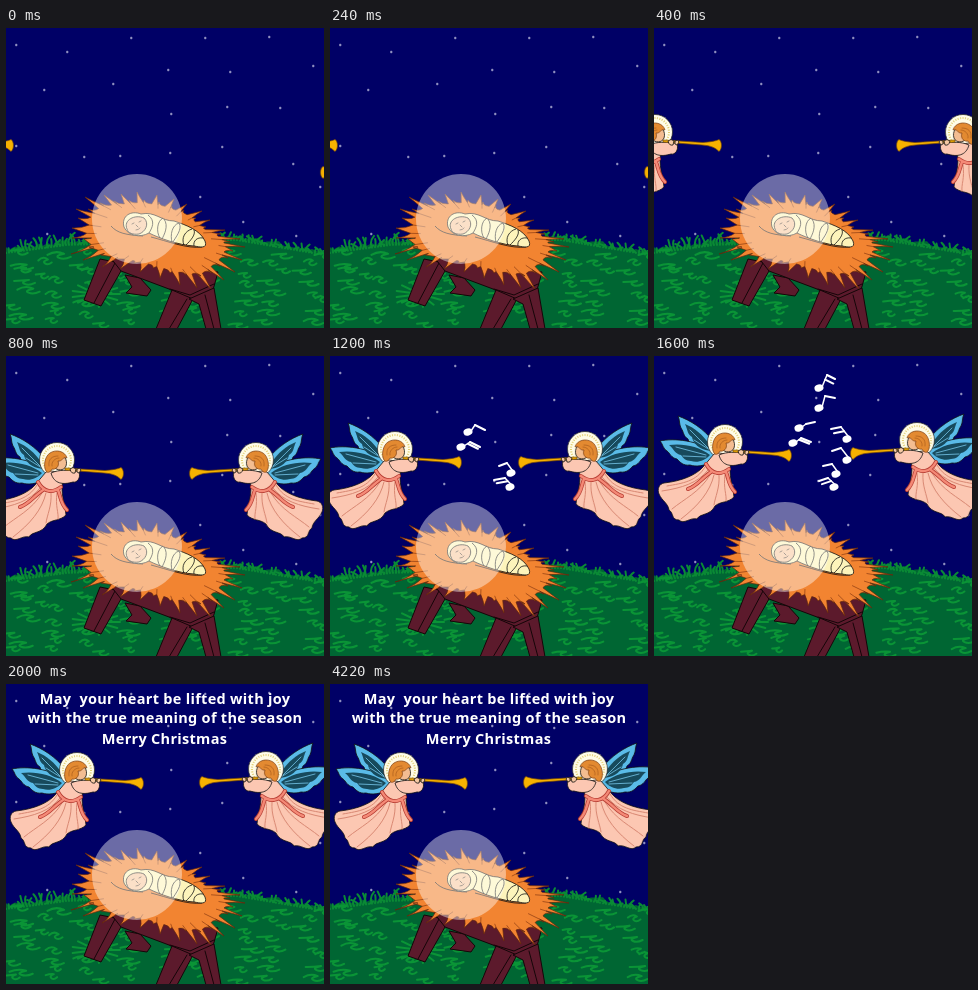
These frames come from a looping animation (318x300 px, 5700 ms). An HTML page:

```html
<!DOCTYPE html>
<html lang="en">
<head>
<meta charset="utf-8">
<title>Manger and angels</title>
<style>
html, body { margin: 0; width: 100%; height: 100%; overflow: hidden; background: #006; }
svg { display: block; width: 318px; height: 300px; }
.left, .right, .song, .wish { animation: 5.7s step-end infinite; }
.left { animation-name: left; }
.right { animation-name: right; }
.song { animation-name: song1; opacity: 0; }
.song.b { animation-name: song2; }
.wish { animation-name: wish; opacity: 0; }
@keyframes left {
  0% { transform: translate(-130px, 18px); }
  7.0175% { transform: translate(-70px, 18px); }
  14.0351% { transform: translate(-20px, 18px); }
  21.0526% { transform: translate(-6px, 7px); }
  28.0702%, 100% { transform: none; }
}
@keyframes right {
  0% { transform: translate(452px, 45px); }
  7.0175% { transform: translate(380px, 18px); }
  14.0351% { transform: translate(321px, 18px); }
  21.0526% { transform: translate(326px, 7px); }
  28.0702% { transform: translate(334px, -2px); }
  35.0877%, 100% { transform: translate(331px, -1px); }
}
@keyframes song1 { 0% { opacity: 0; } 21.0526% { opacity: 1; } 28.0702%, 100% { opacity: 0; } }
@keyframes song2 { 0% { opacity: 0; } 28.0702% { opacity: 1; } 35.0877%, 100% { opacity: 0; } }
@keyframes wish { 0% { opacity: 0; } 35.0877%, 100% { opacity: 1; } }
text { font: bold 14.5px "Noto Sans", "Open Sans", sans-serif; letter-spacing: .3px; fill: #fff; text-anchor: middle; white-space: pre; }
.ink { stroke: #111; stroke-width: .8; stroke-linejoin: round; }
.wood { fill: #5c1a2c; stroke: #150508; stroke-width: 1; stroke-linejoin: round; }
.line { fill: none; stroke-linecap: round; stroke-linejoin: round; }
</style>
</head>
<body>
<svg viewBox="0 0 318 300">
  <defs>
    <g id="angel">
      <g class="ink" fill="#5abbe8">
        <path d="M24 60C36 64 50 73 59 85L62 99L50 96C42 95 35 88 34 83C29 80 30 76 27 72C25 68 26 64 24 60Z"/>
        <path d="M6 85C20 82 44 84 62 97L57 106C50 110 42 111 36 109C29 110 26 106 23 103C17 102 16 97 13 95C9 93 9 88 6 85Z"/>
      </g>
      <path fill="#174a5c" d="M31 68C41 72 49 79 55 88L57 95C45 94 39 87 38 81C33 78 34 74 31 68ZM15 89C28 87 45 90 56 99C51 105 43 107 37 105C32 105 29 102 27 99C21 98 20 93 15 89Z"/>
      <path class="line" stroke="#78c8ec" stroke-width=".8" d="M36 74L54 92M40 84L56 94M22 91L52 99M29 100L52 101"/>
      <circle cx="71" cy="86" r="17.5" fill="#fffce8" stroke="#222" stroke-width=".7"/>
      <circle cx="71" cy="86" r="14" fill="none" stroke="#e2cf72" stroke-width="2" stroke-dasharray="1 1.5"/>
      <path class="ink" fill="#fcc7b2" d="M60 98C67 95 75 99 77 107C74 118 79 130 80 141C74 147 67 145 61 150C56 160 46 157 43 163C36 161 30 169 25 164C17 164 20 157 15 154C14 147 8 145 5 138C3 133 5 128 10 127C28 125 42 119 49 111Z"/>
      <path class="line" stroke="#d98873" stroke-width="1" d="M54 114C44 127 28 132 8 135M56 119C46 136 30 143 18 153M60 119C56 136 44 150 27 163M65 119C66 132 61 141 60 149M51 111C42 126 29 127 13 130M71 119C69 132 73 139 72 145"/>
      <g class="line">
        <path stroke="#b53b31" stroke-width="4" d="M52 108C58 119 67 119 75 113M57 116C48 122 43 130 34 133M72 116C75 123 74 129 81 136"/>
        <path stroke="#f58a77" stroke-width="2.4" d="M52 108C58 119 67 119 75 113M57 116C48 122 43 130 34 133M72 116C75 123 74 129 81 136"/>
      </g>
      <path class="ink" fill="#fcc7b2" d="M65 99C74 95 81 97 88 96L93 98C95 104 91 109 87 108C77 111 68 110 65 99Z"/>
      <path class="ink" fill="#f3bd91" stroke-width=".5" d="M70 80C78 79 82 86 80 92C78 97 71 97 68 93Z"/>
      <path fill="#e38a31" stroke="#7d3e12" stroke-width=".7" d="M60 97C57 92 59 82 64 79C70 75 79 77 81 84C77 82 76 88 72 87C74 93 69 96 66 95C64 99 61 99 60 97Z"/>
      <path class="line" stroke="#a95c1d" stroke-width=".7" d="M63 92C62 85 66 82 72 82M66 92C65 88 69 84 73 84"/>
      <path fill="#f7b200" stroke="#73470a" stroke-width=".7" d="M79 94L119 96.500C126 96 132 95 135 93.500C138 95 138.500 103 135 105.500C130 100 123 99.500 118 99L79 96Z"/>
      <path class="ink" fill="#f7c9a4" stroke-width=".5" d="M84 95q3-3 6 0l-1 4q-4 1-5-4zM91 95q3-2 4 1l-2 3q-3 0-2-4z"/>
    </g>
  </defs>
  <rect width="318" height="300" fill="#006"/>
  <g id="stars" fill="#a9a9d0"></g>
  <g id="ground"></g>
  <g id="manger">
    <path class="wood" d="M119 247L134 250L145 262L141 268L120 265L126 259Z"/>
    <path class="wood" d="M94 231L119 236L95 278L78 272Z"/>
    <path class="line" stroke="#150508" d="M109 235L88 275"/>
    <path class="wood" d="M104 229L212 244L207 262L184 272L163 261L115 243Z"/>
    <path class="wood" d="M166 262L187 271L171 301L150 301Z"/>
    <path class="wood" d="M183 271L208 260L215 301L200 301L193 276Z"/>
    <path class="line" stroke="#150508" d="M181 271L163 301M199 267L208 301M164 261L184 267L208 256"/>
  </g>
  <path id="hay" fill="#f28431" stroke="#63280c" stroke-width=".7" stroke-linejoin="round"/>
  <path id="straw" class="line" stroke="#8b3b12" stroke-width=".7"/>
  <g class="ink">
    <path fill="none" d="M105 198C111 205 120 207 137 208M196 219C181 221 161 213 145 209"/>
    <path fill="#fdf4bb" d="M118 199C115 188 125 182 135 186C149 183 155 193 168 193C180 197 194 202 199 213C202 221 194 219 188 218C172 217 153 210 143 205C134 210 122 208 118 199Z"/>
    <path fill="#f8c99f" d="M121 201C117 192 129 186 138 190C144 196 139 204 133 206C127 207 122 205 121 201Z"/>
    <path class="line" stroke-width=".6" d="M126 196l2-1M133 194l2-1M130 202q3 0 4-2M130 197l2 2"/>
    <path fill="none" d="M142 187C150 193 146 200 143 205M157 190C151 193 150 204 154 210M158 191C163 198 158 207 156 211M173 195C166 197 164 207 166 214M173 195C177 201 169 210 167 214M186 201C179 203 175 210 178 217M188 202C190 207 184 213 180 217M197 210C191 209 187 213 188 218"/>
  </g>
  <circle cx="131" cy="191" r="45" fill="#fff" opacity=".42"/>
  <g class="left"><use href="#angel"/></g>
  <g class="right"><use href="#angel" transform="scale(-1 1)"/></g>
  <g class="song a"></g>
  <g class="song b"></g>
  <g class="wish">
    <text x="159" y="20">May  your heart be lifted with joy</text>
    <text x="159" y="39">with the true meaning of the season</text>
    <text x="158.500" y="60">Merry Christmas</text>
  </g>
</svg>
<script>
const $ = s => document.querySelector(s);
let seed = 11;
const rnd = (a, b) => {
  seed = (seed * 16807) % 2147483647;
  return a + (b - a) * seed / 2147483647;
};
const pairs = s => s.split(' ').map(p => p.split(',').map(Number));

$('#stars').innerHTML = pairs('125,10 199,10 263,9 61,24 10,17 307,38 38,62 107,56 162,42 224,44 221,79 274,80 165,86 10,118 78,129 114,128 164,125 216,119 287,136 314,159 194,169 237,194 290,208 41,206')
  .map(([x, y]) => `<path d="M${x - 1} ${y - .5}h2.500v1h-2.500zM${x - .3} ${y - 1.3}h1v2.600h-1z"/>`).join('');

// Ground: ridge, blades along it, then loose scribbles
const ridge = x => x < 60 ? 221 - x * .13 : x > 230 ? 208 + (x - 230) * .17 : 213 - (x - 60) * .03;
let land = 'M0 300', blades = '', scribble = '';
for (let x = 0; x <= 318; x += 3) {
  const y = ridge(x);
  land += `L${x} ${y + rnd(-2, 2)}`;
  const h = rnd(2, x > 15 && x < 75 ? 13 : 8);
  blades += `M${x} ${y + 4}q${rnd(-3, 3)} ${-h / 2} ${rnd(-6, 6)} ${-h}`;
}
for (let i = 0; i < 72; i++) {
  const x = (i % 9) * 37 + rnd(-12, 14), y = 224 + Math.floor(i / 9) * 10 + rnd(-4, 4), w = rnd(7, 17);
  scribble += `M${x} ${y}q${w / 2} ${rnd(-5, 1)} ${w} -1q${-w * .6} 2 ${-w * .3} 4t${w * .7} -1`;
}
for (let i = 0; i < 13; i++) {
  const a = i / 13 * 6.283;
  scribble += `M90 266l${Math.cos(a) * 24} ${Math.sin(a) * 13}`;
}
$('#ground').innerHTML = `<path fill="#063" d="${land}L318 300Z"/>
  <path class="line" stroke="#0a8a35" stroke-width="2" d="${blades}"/>
  <path class="line" stroke="#0a9436" stroke-width="2" d="${scribble}"/>`;

// Hay: tips of the straws, pulled in towards the middle between them
const tips = pairs('66,200 72,190 70,181 82,181 79,169 94,175 98,167 108,173 115,166 123,172 131,164 138,172 151,167 153,174 168,171 166,178 181,176 178,182 196,183 190,190 204,192 200,199 219,202 215,206 234,211 224,214 239,219 227,223 236,232 222,230 229,244 214,238 218,252 206,245 205,261 195,248 191,260 180,247 174,257 164,245 154,250 147,240 134,244 128,235 114,241 109,231 96,239 95,227 77,232 83,219 65,226 78,211 66,210');
const inward = ([x, y], k) => [152 + (x - 152) * k, 207 + (y - 207) * k];
let hay = '', straw = '';
tips.forEach((p, i) => {
  const q = tips[(i + 1) % tips.length];
  const mid = inward([(p[0] + q[0]) / 2, (p[1] + q[1]) / 2], .83);
  hay += `${i ? 'L' : 'M'}${p}Q${inward(p, .9)} ${mid}`;
  if (i % 2 == 0) straw += `M${mid}L${inward(mid, rnd(.8, .93))}`;
});
$('#hay').setAttribute('d', hay + 'Z');
$('#straw').setAttribute('d', straw);

// Note: head, stem top, flag end, number of flags
const note = ([x, y, sx, sy, fx, fy, n]) => {
  const side = sx > x ? 3 : 2.5;
  let d = '';
  for (let k = 0; k < n; k++) {
    const t = k * .35, ox = (x + side - sx) * t, oy = (y - sy) * t;
    d += `M${sx + ox} ${sy + oy}L${fx + ox} ${fy + oy}`;
  }
  return `<ellipse cx="${x}" cy="${y}" rx="4.600" ry="3.500" transform="rotate(-15 ${x} ${y})"/>
    <path class="line" stroke="#fff" stroke-width="1.500" d="M${x + side} ${y - 1}L${sx} ${sy}"/>
    <path class="line" stroke="#fff" stroke-width="2" d="${d}"/>`;
};
const song = (sel, list) => {
  $(sel).setAttribute('fill', '#fff');
  $(sel).innerHTML = list.split(' ').map(s => note(s.split(',').map(Number))).join('');
};
song('.a', '138,76,145,69,155,74,1 131,91,140,86,150,91,2 181,117,177,107,169,110,1 180,131,175,122,164,124,2');
song('.b', '165,52,171,40,181,42,1 165,32,173,19,181,23,2 145,72,152,68,161,66,1 139,87,147,82,157,86,2 193,83,187,71,177,73,2 193,104,187,92,178,95,1 182,118,178,108,169,110,1 180,131,174,122,165,125,2');
</script>
</body>
</html>
```
